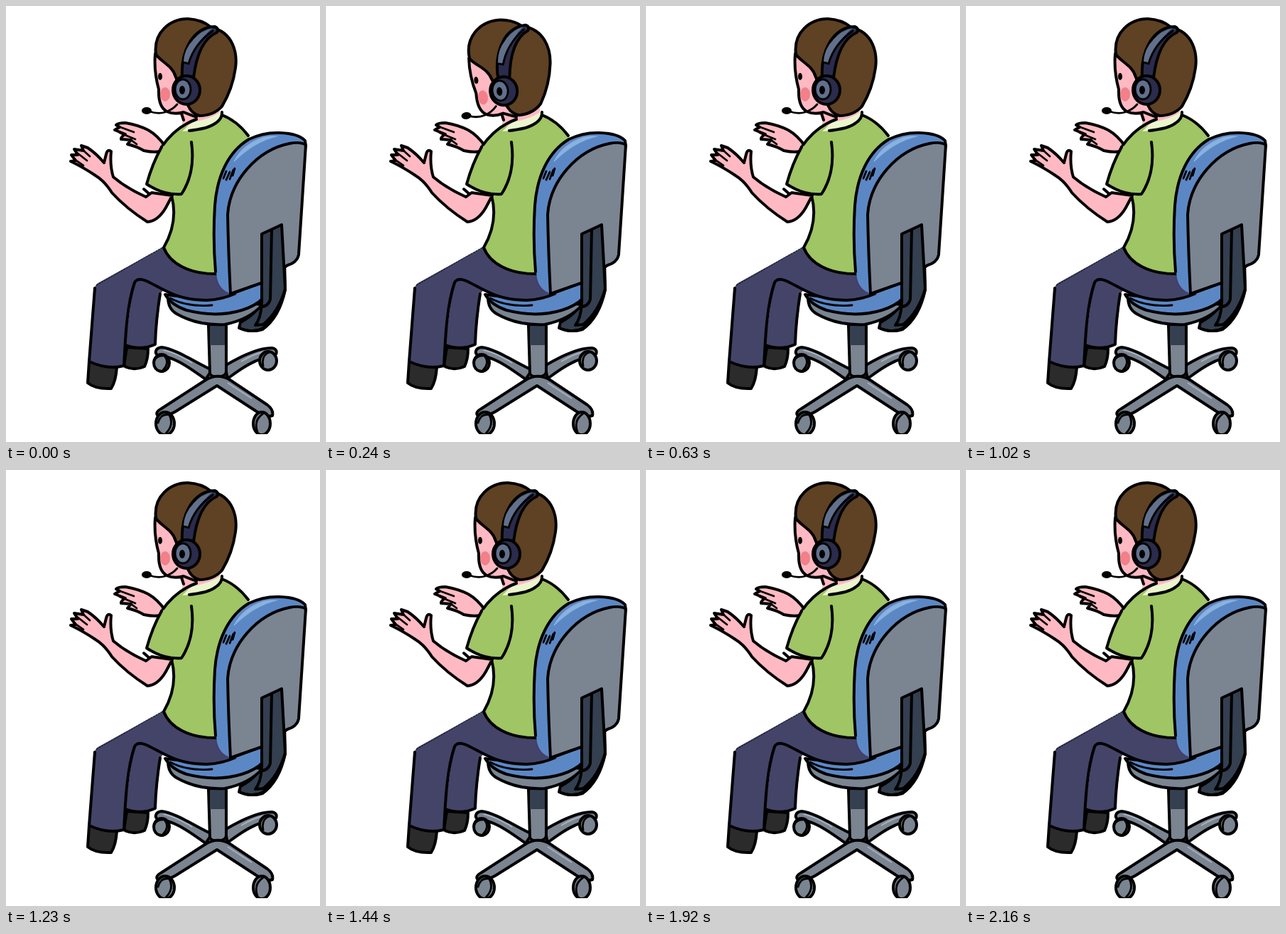
Recreate the animation shown at these times as an HTML page. Size 442 by 612 pixels, loop 2190 ms.

```html
<!DOCTYPE html>
<html lang="en">
<head>
<meta charset="utf-8">
<title>Headset operator</title>
<style>
  html, body { margin: 0; width: 100%; height: 100%; overflow: hidden; background: #fff; }
  svg { display: block; width: 442px; height: 612px; }
  .ink { stroke: #000; stroke-width: 4; stroke-linecap: round; stroke-linejoin: round; }
  .thin { stroke-width: 2.8; }
  .line { fill: none; }
  .hair { fill: #5f4123; }
  .skin { fill: #ffb9c3; }
  .shirt { fill: #a0c564; }
  .collar { fill: #eaf6cf; }
  .pants { fill: #434468; }
  .shoe { fill: #2b2b2b; }
  .blue { fill: #5b88c5; }
  .shine { fill: #8bb1df; }
  .grey { fill: #7b8491; }
  .slate { fill: #343f50; }
  .navy { fill: #2b2c4b; }
  .steel { fill: #61708b; }
</style>
</head>
<body>
<svg viewBox="0 0 442 612" xmlns="http://www.w3.org/2000/svg">
  <defs><clipPath id="floor"><path d="M0 0H442V601H0Z"/></clipPath></defs>

  <g id="base" clip-path="url(#floor)">
    <g class="ink grey">
      <path d="M290 511C268 501 238 481 219 479C210 480 208 488 215 491C238 492 258 508 281 524Z"/>
      <path d="M308 505C330 492 354 480 374 480C383 481 383 490 374 492C353 494 332 508 312 523Z"/>
      <path d="M285 448H310V514C308 522 290 523 287 516Z"/>
    </g>
    <path class="slate" d="M287 449H308V476H287Z"/>
    <path class="ink grey" d="M281 525Q297 515 314 524L368 560Q377 567 375 575Q366 578 354 570L297 533L239 569Q224 578 213 574Q210 570 219 565Z"/>
    <path class="line" stroke="#a7b0bd" stroke-width="2" d="M222 483Q240 487 262 501M331 499Q351 487 369 484M312 529L346 551"/>
    <g class="ink grey">
      <ellipse cx="219" cy="501" rx="11" ry="12"/>
      <ellipse cx="369" cy="498" rx="12" ry="13"/>
      <ellipse cx="224" cy="586" rx="13" ry="16"/>
      <ellipse cx="360" cy="586" rx="12" ry="16"/>
    </g>
    <g class="ink thin line">
      <path d="M208 500Q211 490 223 491Q231 501 221 511M371 486Q359 490 362 505"/>
      <path d="M214 585Q218 571 230 574Q237 588 225 600M362 572Q348 581 354 598"/>
    </g>
  </g>

  <g id="seat">
    <path class="ink slate" d="M328 452Q346 460 362 452Q385 432 393 398L391 310Q389 304 382 307L362 318L360 414Q353 432 330 444Z"/>
    <path class="ink grey" d="M228 409Q228 425 240 432Q270 449 308 447Q343 440 361 419Z"/>
    <path class="ink blue" d="M224 405Q233 420 254 427Q296 438 332 427Q351 421 361 411L360 388L318 404L280 412Z"/>
    <path class="ink thin line" d="M231 410Q255 423 290 420"/>
  </g>

  <g id="legs">
    <path class="ink shoe" d="M170 479L166 505Q179 513 195 506Q200 496 200 481Z"/>
    <path class="pants" d="M180 386L167 477Q192 485 210 475L218 403L222 398L190 380Z"/>
    <path class="ink line" d="M167 476Q190 484 210 475Q211 441 217 404"/>
    <path class="ink shoe" d="M117 499L115 529Q126 538 148 537Q155 526 156 506Z"/>
    <path class="pants" d="M222 338L131 388Q125 391 124 399L117 499Q143 511 166 505C168 465 171 421 181 388Q186 382 198 386C224 398 241 413 283 413Q304 412 320 405L299 375Z"/>
    <path class="ink line" d="M125 396Q121 448 117 499Q143 511 166 505C168 465 170 421 181 388Q186 380 200 387C224 399 241 413 283 413Q304 412 322 404"/>
    <path class="line" stroke="#222138" stroke-width="1.5" stroke-dasharray="3 1" d="M127 392L222 338"/>
  </g>

  <g id="torso">
    <path class="ink skin" d="M224 197Q214 182 200 174Q186 167 168 164Q158 164 155 167L160 170L153 174L168 180Q162 183 162 187L176 188L171 194Q184 197 194 203Q208 206 217 204Z"/>
    <path class="ink thin line" d="M158 169L180 177M160 178L182 187M176 188L184 194"/>
    <path class="skin" d="M245 140L249 160L246 172L262 174L301 153V138Z"/>
    <path class="shirt" d="M250 168Q233 178 220 197Q207 221 198 250Q218 263 233 266Q240 303 222 339C230 360 256 377 301 376L342 183Q322 160 304 153L280 171Z"/>
    <path class="collar" d="M248 176L262 163Q288 159 303 148L305 153Q300 166 280 171Q264 175 248 176Z"/>
    <path class="ink line" d="M268 159Q238 170 219 198M304 153Q325 161 341 182M233 266Q243 303 222 339C230 360 256 377 299 376"/>
    <path class="ink line" d="M304 149Q305 163 281 171Q268 174 258 175M247 151L250 160"/>
  </g>

  <g id="arm">
    <path class="ink skin" d="M205 262L197 268Q170 256 151 240Q146 224 148 204Q143 200 141 208L138 220Q127 207 115 199L106 196L109 203L96 201L101 209L92 209L98 217L91 218Q108 226 126 238Q139 246 149 262Q169 284 199 303Q214 302 225 283L234 266Z"/>
    <path class="ink thin line" d="M108 202L118 211M100 206L114 217M96 215L109 224"/>
    <path class="shirt" d="M220 197Q206 221 198 250Q222 266 247 264Q269 236 261 190Z"/>
    <path class="ink line" d="M219 198Q206 221 198 250Q222 266 247 264Q267 234 261 191M194 257L202 264"/>
  </g>

  <g id="backrest">
    <path class="blue" d="M342 187C312 205 297 240 294 280Q291 340 297 383Q301 401 316 404L408 360L422 192Q412 178 376 178Q357 179 342 187Z"/>
    <path class="shine" d="M321 217Q333 194 362 184Q374 181 383 183Q350 190 321 219Z"/>
    <path class="ink grey" d="M316 404Q313 345 312 293C315 245 354 202 399 193Q414 190 422 195L412 349Q410 360 396 364L359 389Z"/>
    <path class="ink line" d="M295 373Q291 328 294 280C297 240 312 205 342 187Q363 177 385 178Q412 179 421 189L422 197"/>
    <path class="ink thin line" d="M306 242L310 232M310 244L315 233M315 243L320 230M319 238L322 228"/>
    <path class="line" stroke="#42406a" stroke-width="2" d="M295 378Q298 398 314 404"/>
    <path class="ink slate" d="M360 320L388 307L393 397Q384 429 362 447L351 448Q359 438 360 417Z"/>
    <path class="ink line" d="M374 314L372 412Q369 421 361 422M393 398Q385 437 361 454Q344 459 329 452"/>
  </g>

  <g id="head">
    <path class="ink skin" d="M210 67Q208 92 215 117Q214 141 226 148Q237 153 250 149L268 156L256 73Z"/>
    <ellipse cx="224" cy="124" rx="7" ry="10" fill="#f28089"/>
    <ellipse cx="217" cy="99" rx="3" ry="5"/>
    <path class="ink hair" d="M211 68C207 37 231 18 256 18Q276 19 289 30C320 37 326 66 323 87Q319 116 304 141Q292 154 272 154Q261 151 256 139L239 100C235 84 219 79 211 68Z"/>
    <path class="ink navy" d="M248 101Q246 68 262 46Q275 29 294 29Q300 31 297 37C278 45 268 68 264 101Z"/>
    <path class="steel" d="M250 78Q251 60 264 47Q275 34 291 31Q268 49 258 80Z"/>
    <path class="ink thin line" d="M250 79L257 81Q265 53 291 35"/>
    <ellipse class="ink navy" cx="254" cy="118" rx="19" ry="20"/>
    <ellipse class="ink thin steel" cx="249" cy="117" rx="11" ry="14"/>
    <ellipse cx="248" cy="118" rx="4" ry="6"/>
    <path class="ink thin line" d="M202 148Q214 152 224 149Q234 146 241 138"/>
    <ellipse cx="198" cy="147" rx="7" ry="5"/>
  </g>
</svg>
<script>
  const LOOP = 2190, STEP = 30, TILT_TIME = 540, MAX_TILT = 6.1;
  const head = document.getElementById("head");
  const start = performance.now();

  // One sideways tilt, then a still pose until the loop restarts.
  function tiltAt(time) {
    return time < TILT_TIME ? -MAX_TILT * Math.sin(Math.PI * time / TILT_TIME) : 0;
  }

  function draw(now) {
    const elapsed = Math.max(0, now - start) % LOOP;
    const time = Math.floor(elapsed / STEP) * STEP;
    head.setAttribute("transform", `rotate(${tiltAt(time).toFixed(3)} 265 155)`);
    requestAnimationFrame(draw);
  }
  draw(start);
</script>
</body>
</html>
```
